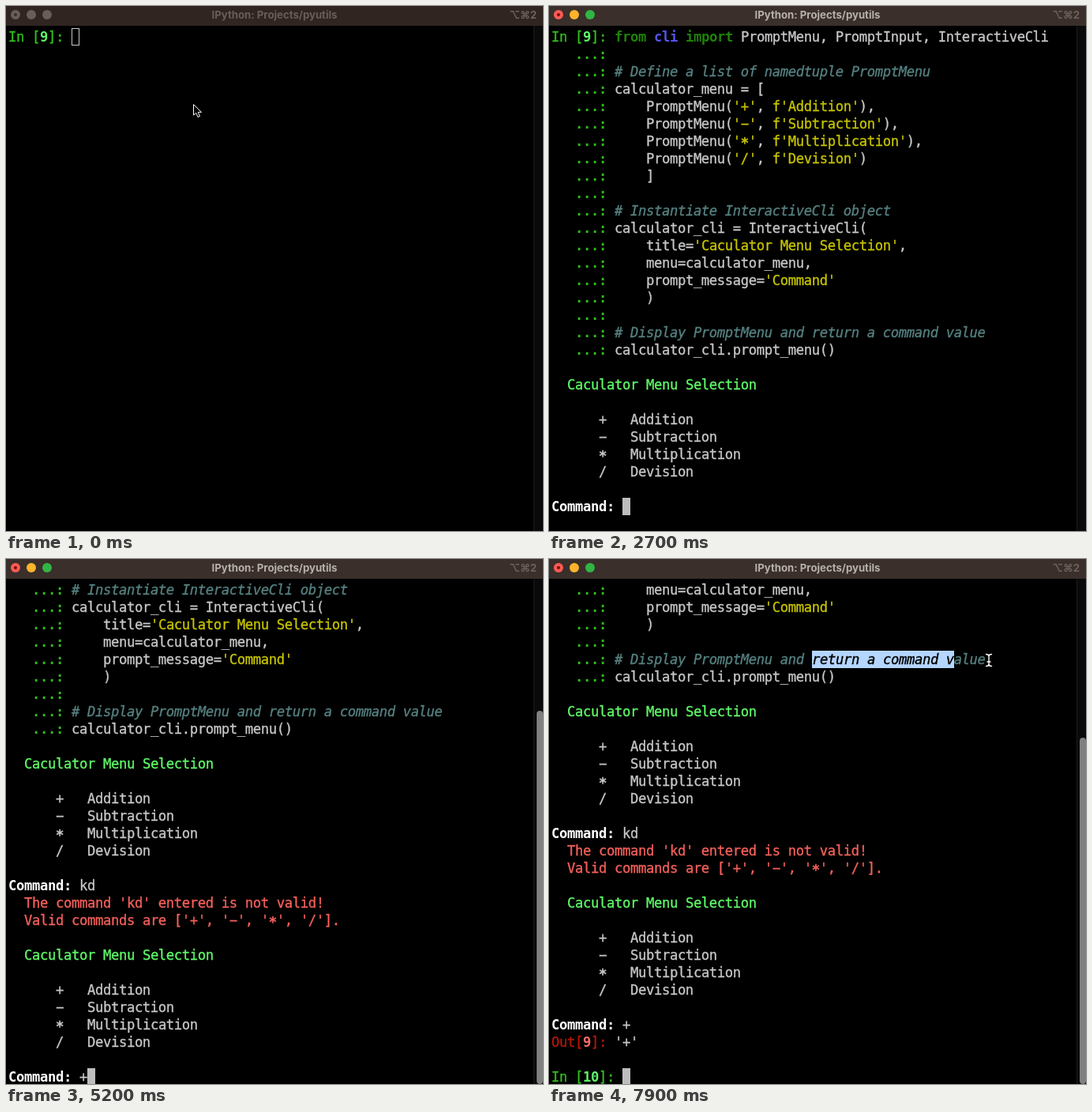
Write an HTML page that moves like this. It is 680x664 px and loops after 8 s.

```html
<!DOCTYPE html>
<html lang="en">
<head>
<meta charset="utf-8">
<title>IPython session</title>
<style>
html, body { margin: 0; width: 100%; height: 100%; overflow: hidden; background: #000; }
#stage { position: relative; width: 680px; height: 664px; overflow: hidden; background: #000; }
#stage div, #stage svg { position: absolute; }

#bar { left: 0; top: 0; width: 680px; height: 25px; background: #302521;
  font: 700 13.2px/22px Inter, "DejaVu Sans", sans-serif; color: #675e5a; }
#bar.on { background: #3a2f2b; color: #b7b0ac; }
#name { width: 680px; text-align: center; white-space: pre; }
#keys { right: 8px; color: #6b625e; }
.light { top: 5px; width: 12px; height: 12px; border-radius: 50%; background: #675d59; }
.on .light { background: var(--c); }
.light i { position: absolute; left: 4px; top: 4px; width: 4px; height: 4px;
  border-radius: 50%; background: #3a2f2b; }
.on .light i { background: #7a0a08; }

#track { left: 668px; top: 25px; width: 11px; height: 639px; background: #0a0a0a; border-left: 1px solid #1c1c1c; }
#thumb { left: 672px; width: 8px; bottom: 0; border-radius: 4px; background: #808080; }

#view { left: 3px; top: 28px; width: 664px; height: 636px; overflow: hidden;
  font: 17.2px/22px "DejaVu Sans Mono", monospace; letter-spacing: calc(10px - .60205em);
  -webkit-text-stroke: .35px; color: #c7c7c7; }
#doc { left: 0; top: 0; width: 664px; }
.row, #sel { height: 22px; white-space: pre; overflow: hidden; }
.d, .n, .k, .b, .w, .r { font-weight: 700; -webkit-text-stroke: 0; }
.p, .d { color: #2fbd1a; }
.n { color: #5ffa68; }
.k { color: #1f8208; }
.b { color: #5555f0; }
.s { color: #c7c400; }
.c { color: #568080; font-style: italic; }
.g { color: #5ffa68; }
.w { color: #fff; }
.e { color: #f4605a; }
.o { color: #b4170b; }
.r { color: #ff6e67; }
.star { position: relative; top: 2px; font-weight: 700; }
.h { display: inline-block; height: 22px; vertical-align: top; }
.h.lit { background: #a9d4d0; color: #111; }
#cursor { width: 10px; height: 22px; box-sizing: border-box; background: #bdbdbd; }
#cursor.off { background: none; border: 1px solid #c7c7c7; }
#sel { background: #b4d5fe; color: #000; font-style: italic; }
#arrow, #beam { left: 0; top: 0; overflow: visible; }
</style>
</head>
<body>
<div id="stage">
  <div id="bar">
    <div class="light" style="left:6px;--c:#fb5a54"><i></i></div>
    <div class="light" style="left:26px;--c:#fdb32b"></div>
    <div class="light" style="left:46px;--c:#32b444"></div>
    <div id="name">IPython: Projects/pyutils</div>
    <div id="keys">⌥⌘2</div>
  </div>
  <div id="track"></div>
  <div id="thumb"></div>
  <div id="view"><div id="doc"></div></div>
  <svg id="arrow" width="12" height="18">
    <path d="M.5 .5V14L3.7 11.2L6 16.5L8.4 15.5L6.2 10.3H10.5Z" fill="#000" stroke="#fff"/>
  </svg>
  <svg id="beam" width="1" height="1" fill="none" stroke-linecap="round">
    <path id="ibar" d="M-3.5 -7.5Q0 -7.5 0 -5Q0 -7.5 3.5 -7.5M0 -5V5M-3.5 7.5Q0 7.5 0 5Q0 7.5 3.5 7.5M-2 2H2" stroke="#000" stroke-width="3.4"/>
    <path d="M-3.5 -7.5Q0 -7.5 0 -5Q0 -7.5 3.5 -7.5M0 -5V5M-3.5 7.5Q0 7.5 0 5Q0 7.5 3.5 7.5M-2 2H2" stroke="#fff" stroke-width="1.4"/>
  </svg>
</div>
<script>
const LOOP = 8000, TICK = 100, CELL = 10, ROW = 22;
const $ = id => document.getElementById(id);

// {x text} gives the text class x
const code = `{k from} {b cli} {k import} PromptMenu, PromptInput, InteractiveCli

{c # Define a list of namedtuple PromptMenu}
calculator_menu = [
    PromptMenu({s '+'}, {s f'Addition'}),
    PromptMenu({s '−'}, {s f'Subtraction'}),
    PromptMenu({s '*'}, {s f'Multiplication'}),
    PromptMenu({s '/'}, {s f'Devision'})
    ]

{c # Instantiate InteractiveCli object}
calculator_cli = InteractiveCli(
    title={s 'Caculator Menu Selection'},
    menu=calculator_menu,
    prompt_message={s 'Command'}
    )

{c # Display PromptMenu and return a command value}
calculator_cli.prompt_menu{h ()}`.split('\n');

const prompt = n => `{p In [}{n ${n}}{p ]: }`;
const menu = [
  '  {g Caculator Menu Selection}', '',
  '      +   Addition',
  '      −   Subtraction',
  '      *   Multiplication',
  '      /   Devision', ''
];
const lines = [
  ...code.map((s, i) => (i ? '   {d ...: }' : prompt(9)) + s),
  '', ...menu,
  '{w Command: }kd',
  "  {e The command 'kd' entered is not valid!}",
  "  {e Valid commands are ['+', '−', '*', '/'].}",
  '', ...menu,
  '{w Command: }+',
  "{o Out[}{r 9}{o ]: }'+'",
  '',
  prompt(10)
];

// time, rows shown, first row in view, cursor column, top of the scroll thumb
const steps = [
  [0, 1, 0, 8, 664],
  [800, 19, 0, 36, 664],
  [1900, 28, 0, 9, 664],
  [2900, 28, 0, 10, 664],
  [3100, 28, 0, 11, 664],
  [3600, 39, 10, 9, 192],
  [4800, 39, 10, 10, 192],
  [5400, 42, 13, 9, 226]
];
const FOCUS = 200, HIDE = 1900, SHOW = 7200, DRAG = 7400;
const SEL_ROW = 17, SEL_COL = 33;

// pointer path: time, x, y
const path = [
  [100, 237, 124], [400, 226, 113], [SHOW - 1, 226, 113],
  [SHOW, 330, 127], [DRAG, 334, 127], [7900, 557, 128]
];

const markup = s => s
  .replace(/\{(\w) (.*?)\}/g, '<span class="$1">$2</span>')
  .replace('*', '<span class="star">*</span>');

const doc = $('doc');
doc.innerHTML = lines.map((s, i) =>
  `<div class="row" style="top:${i * ROW}px">${markup(s)}</div>`).join('') +
  '<div id="sel">return a command value</div><div id="cursor"></div>';
const rows = [...doc.querySelectorAll('.row')];
const bracket = doc.querySelector('.h');

function pointer(t) {
  const i = path.findIndex(p => p[0] > t);
  if (i === 0) return path[0].slice(1);
  if (i < 0) return path[path.length - 1].slice(1);
  const a = path[i - 1], b = path[i], k = (t - a[0]) / (b[0] - a[0]);
  return [a[1] + (b[1] - a[1]) * k, a[2] + (b[2] - a[2]) * k];
}

const show = (el, on) => { el.style.display = on ? '' : 'none'; };

function draw(t) {
  const [start, count, top, col, thumb] = steps.filter(s => s[0] <= t).pop();
  rows.forEach((row, i) => {
    show(row, i < count);
    row.style.width = i === count - 1 ? col * CELL + 'px' : '';
  });
  doc.style.top = -top * ROW + 'px';
  bracket.classList.toggle('lit', start === 800);

  const cursor = $('cursor');
  cursor.style.left = col * CELL + 'px';
  cursor.style.top = (count - 1) * ROW + 'px';
  cursor.classList.toggle('off', t < FOCUS);
  $('bar').classList.toggle('on', t >= FOCUS);
  $('thumb').style.top = thumb + 'px';
  show($('thumb'), thumb < 664);

  const [x, y] = pointer(t);
  const arrow = t < 400, visible = t < HIDE || t >= SHOW;
  show($('arrow'), visible && arrow);
  show($('beam'), visible && !arrow);
  $(arrow ? 'arrow' : 'beam').style.transform = `translate(${x}px, ${y}px)`;

  // the selection trails the pointer by one tick
  const picked = t > DRAG ? Math.round((pointer(t - TICK)[0] - 3) / CELL) - SEL_COL : 0;
  const sel = $('sel');
  show(sel, picked > 0);
  sel.style.left = SEL_COL * CELL + 'px';
  sel.style.top = SEL_ROW * ROW + 'px';
  sel.style.width = picked * CELL + 'px';
}

let last = -1;
function loop() {
  const t = Math.floor(performance.now() % LOOP / TICK) * TICK;
  if (t !== last) draw(last = t);
  requestAnimationFrame(loop);
}
loop();
</script>
</body>
</html>
```
